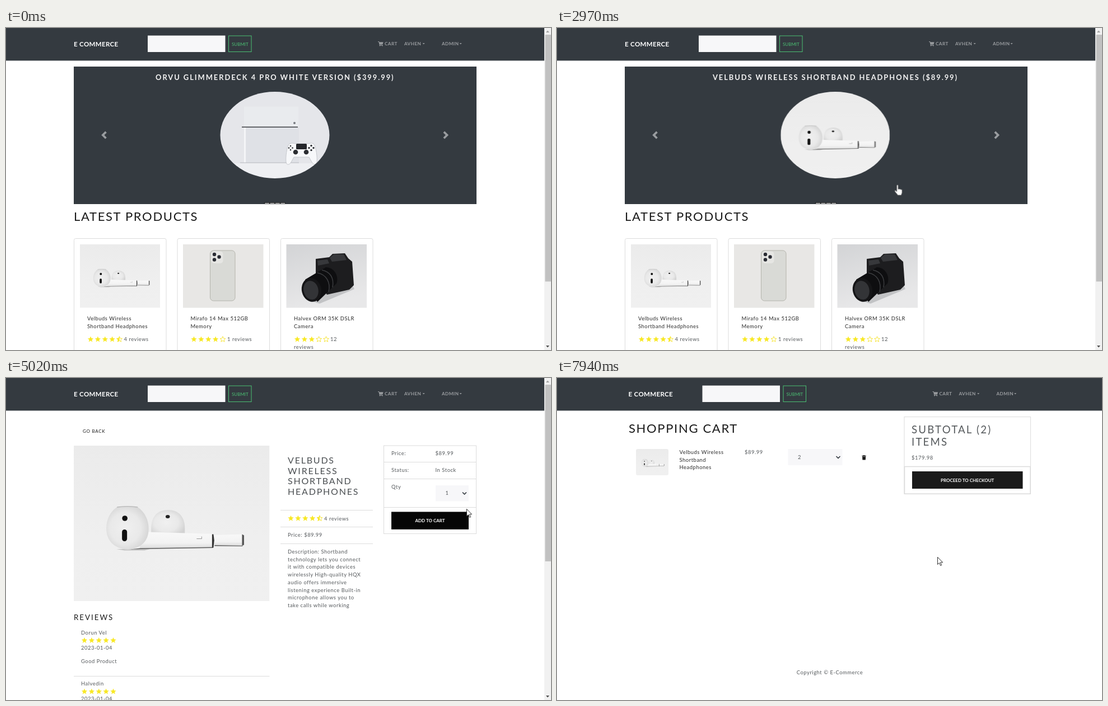
These frames come from a looping animation (973 by 576 pixels, 8 s). An HTML page:

```html
<!DOCTYPE html>
<html lang="en">
<head>
<meta charset="utf-8">
<title>Shop walkthrough</title>
<style>
html, body { margin: 0; width: 100%; height: 100%; overflow: hidden; background: #fff; }
svg { display: block; font-family: Lato, "Open Sans", sans-serif; }
text { white-space: pre; }

/* type */
.t { font-size: 9.4px; letter-spacing: .55px; fill: #55595c; }
.k { fill: #2a2a2a; }
.h1 { font-size: 22px; letter-spacing: 1.67px; fill: #1a1a1a; }
.h2 { font-size: 18.6px; letter-spacing: 2.2px; fill: #55595c; }
.h3 { font-size: 16px; letter-spacing: 1.8px; fill: #4b4f52; }
.h4 { font-size: 13.3px; letter-spacing: 2px; fill: #1a1a1a; }
.cap { font-size: 12.9px; font-weight: 700; letter-spacing: 1.95px; fill: #f4f4f4; text-anchor: middle; }
.brand { font-size: 11.5px; font-weight: 700; letter-spacing: .35px; fill: #fff; }
.nav { font-size: 8.2px; font-weight: 700; letter-spacing: .4px; }
.btn { font-size: 8px; font-weight: 700; fill: #fff; text-anchor: middle; }
.back { font-size: 8px; letter-spacing: .7px; fill: #1a1a1a; }
.url { font: 9.6px "Open Sans", "Noto Sans", sans-serif; fill: #3c4043; }
.line { fill: none; stroke: #dcdcdc; }
.chev { fill: none; stroke: #343a40; stroke-width: 1.7; stroke-linecap: round; stroke-linejoin: round; }
.star { fill: #f8e825; stroke: #f8e825; stroke-width: .2; stroke-linejoin: round; }
.hollow { fill: none; stroke: #f5e11c; stroke-width: .9; stroke-linejoin: round; }

/* hard switches */
.head, .home, .load, .item, .cart, .old, .status, .popup, .one, .two,
.opt1, .opt2, .empty, .full, .arrow, .hand { animation: 8s step-end infinite; }
.head { animation-name: head; }
.home { animation-name: home; }
.load { animation-name: load; }
.item { animation-name: item; }
.cart { animation-name: cart; }
.old { animation-name: old; }
.status { animation-name: status; }
.popup { animation-name: popup; }
.one { animation-name: one; }
.two { animation-name: two; }
.opt1 { animation-name: opt1; }
.opt2 { animation-name: opt2; }
.empty { animation-name: empty; }
.full { animation-name: full; }
.arrow { animation-name: arrow; }
.hand { animation-name: hand; }
@keyframes head {
  0%, 54.125% { transform: none; }
  49.75%, 91.75%, to { transform: translateX(6.5px); }
}
@keyframes home { 0% { opacity: 1; } 49.75%, to { opacity: 0; } }
@keyframes load { 0%, 54.125%, to { opacity: 0; } 49.75% { opacity: 1; } }
@keyframes item { 0%, 91.75%, to { opacity: 0; } 54.125% { opacity: 1; } }
@keyframes cart { 0% { opacity: 0; } 91.75%, to { opacity: 1; } }
@keyframes old { 0% { opacity: 1; } 31%, to { opacity: 0; } }
@keyframes status { 0%, 54.125%, to { opacity: 0; } 42.25% { opacity: 1; } }
@keyframes popup { 0%, 80.5%, to { opacity: 0; } 67.75% { opacity: 1; } }
@keyframes one { 0% { opacity: 1; } 80.5%, to { opacity: 0; } }
@keyframes two { 0% { opacity: 0; } 80.5%, to { opacity: 1; } }
@keyframes opt1 { 0% { opacity: 1; } 73.75%, to { opacity: 0; } }
@keyframes opt2 { 0% { opacity: 0; } 73.75%, to { opacity: 1; } }
@keyframes empty { 0% { opacity: 1; } 96.125%, to { opacity: 0; } }
@keyframes full { 0% { opacity: 0; } 96.125%, to { opacity: 1; } }
@keyframes arrow {
  0%, 35.5%, 60%, 83%, 88.1% { opacity: 0; }
  1.625%, 49.75%, 62.3%, 85.75%, 91.75%, to { opacity: 1; }
}
@keyframes hand {
  0%, 49.75%, 62.3%, 85.75%, 91.75%, to { opacity: 0; }
  35.5%, 60%, 83%, 88.1% { opacity: 1; }
}

/* motion */
.new { animation: slide 8s infinite; }
@keyframes slide {
  0%, 30.45% { transform: translateX(719px); animation-timing-function: ease-in-out; }
  37.95%, to { transform: none; }
}
.spin { transform-origin: 487px 153px; animation: spin 8s linear infinite; }
@keyframes spin { from { transform: rotate(265.6deg); } to { transform: rotate(4105.6deg); } }
.focus { animation: focus 8s linear infinite; }
@keyframes focus { 0%, 67.75% { opacity: 0; } 70%, to { opacity: 1; } }
.add { animation: add 8s linear infinite; }
@keyframes add {
  0%, 60%, 64.25%, 83%, 86.7%, 88.1% { fill: #1a1a1a; }
  61%, 62.3%, 84.25%, 85.75%, 89.5%, to { fill: #000; }
}
.mouse { animation: mouse 8s linear infinite; }
@keyframes mouse {
  0%, 1.625% { transform: translate(870px, 530px); }
  3.25%, 7.375% { transform: translate(714px, 420px); }
  8.25%, 12.625% { transform: translate(723px, 417px); }
  15.125%, 21.75% { transform: translate(738px, 401px); }
  22.625%, 31% { transform: translate(757px, 402px); }
  37.125% { transform: translate(608px, 282px); }
  40.5%, 41.375% { transform: translate(489px, 174px); }
  47.375%, 54.125% { transform: translate(491px, 182px); }
  59.25% { transform: translate(760px, 300px); }
  61% { transform: translate(790px, 262px); }
  62.75% { transform: translate(822px, 234px); }
  64.5%, 70.375% { transform: translate(808px, 208px); }
  76.375%, 80.5% { transform: translate(795px, 240px); }
  86.625%, 87.5% { transform: translate(751px, 282px); }
  90.125%, 96.125% { transform: translate(734px, 256px); }
  99.25%, to { transform: translate(679px, 320px); }
}
</style>
</head>
<body>
<svg width="973" height="576" viewBox="0 0 973 576">
<defs>
  <linearGradient id="wall" x2="0" y2="1">
    <stop offset="0" stop-color="#ebebeb"/><stop offset=".6" stop-color="#efefef"/><stop offset="1" stop-color="#f0f0f0"/>
  </linearGradient>
  <linearGradient id="stem" x2="0" y2="1">
    <stop offset="0" stop-color="#f8f8f8"/><stop offset=".65" stop-color="#f3f3f3"/><stop offset="1" stop-color="#dadada"/>
  </linearGradient>
  <radialGradient id="shell" cx=".45" cy=".5" r=".6">
    <stop offset="0" stop-color="#f0f0f0"/><stop offset=".6" stop-color="#e9e9e9"/><stop offset="1" stop-color="#d2d2d2"/>
  </radialGradient>
  <linearGradient id="grey" x2=".3" y2="1">
    <stop offset="0" stop-color="#d3d4d6"/><stop offset="1" stop-color="#e8e8e9"/>
  </linearGradient>
  <clipPath id="stage"><rect x="121" y="69" width="718.5" height="245.5"/></clipPath>
  <clipPath id="oval"><ellipse cx="480" cy="191.5" rx="97.5" ry="77.5"/></clipPath>
  <clipPath id="thumb"><rect x="141" y="127" width="58" height="47" rx="3"/></clipPath>

  <symbol id="buds" viewBox="0 0 349 278" preserveAspectRatio="none">
    <path fill="url(#wall)" d="M0 0h349v278H0z"/>
    <path fill="#c4c4c4" d="M76 185h60l-10 2.500H90z"/>
    <path fill="url(#shell)" d="M138 148c0-22 12-33 30-33s30 11 30 33v12h-60z"/>
    <path fill="url(#stem)" d="M118 154l131 4v24l-131 2.500z"/>
    <path fill="#5c5c5c" d="M100 185.500l18-2 130-2v1.500l-128 2z"/>
    <path fill="#333" d="M246.500 158.500h2.500l1.500 11-1.500 13h-2.500z"/>
    <path fill="url(#stem)" d="M250.500 160l50-1.500v20.500l-50-1z"/>
    <path fill="#555" d="M251 178l50 1v1l-50-.5zM300 158.500l3.500 2v17l-3.500 1.500z"/>
    <path fill="none" stroke="#999" d="M219 166.500h9v-4"/>
    <path fill="url(#shell)" d="M77 110c12-1.500 26-1.500 37 0 13 9 19.500 23 19.500 39 0 20-12 35-37.500 37-25-2-38-17-38-38 0-16 7-30 19-38z"/>
    <path fill="none" stroke="#a8a8a8" d="M77 110c12-1.500 26-1.500 37 0"/>
    <circle cx="91" cy="130" r="4.800" fill="#111"/>
    <rect x="86" y="150" width="9" height="21" rx="4.500" fill="#111"/>
    <ellipse cx="167.500" cy="127" rx="3.800" ry="3" fill="#222"/>
  </symbol>

  <path id="s" transform="scale(.94)" d="M0-5.6 1.5-2 5.3-1.7 2.4.8 3.3 4.5 0 2.5-3.3 4.5-2.4.8-5.3-1.7-1.5-2z"/>
  <use id="on" href="#s" class="star"/>
  <use id="off" href="#s" class="hollow"/>
  <g id="half"><use href="#off"/><path class="star" transform="scale(.94)" d="M0-5.6V2.5L-3.3 4.5-2.4.8-5.3-1.7-1.5-2z"/></g>
  <g id="three"><use href="#on"/><use href="#on" x="12.9"/><use href="#on" x="25.8"/></g>
  <g id="four"><use href="#three"/><use href="#on" x="38.6"/></g>
  <g id="rate45"><use href="#four"/><use href="#half" x="51.5"/></g>
  <g id="rate5"><use href="#four"/><use href="#on" x="51.5"/></g>

  <rect id="card" class="line" x=".5" y="376.5" width="164.5" height="230" rx="3"/>
  <g id="bar">
    <path fill="#f1f1f1" d="M961 0h12v576h-12z"/>
    <path fill="#a3a3a3" d="M964 8l3-3.500 3 3.500z"/>
    <path fill="#505050" d="M964 568l3 3.500 3-3.500z"/>
  </g>
  <path id="down" class="chev" d="M-3-1.500 0 1.500 3-1.500"/>
  <path id="caret" d="M0 0h4l-2 2.300z"/>
  <text id="copy" class="t" x="487" y="530" text-anchor="middle">Copyright © E-Commerce</text>
</defs>

<rect width="973" height="576" fill="#fff"/>
<rect width="973" height="58.4" fill="#343a40"/>

<g class="head">
  <text class="brand" x="121" y="32.5">E COMMERCE</text>
  <rect x="253" y="13.5" width="138.5" height="29.5" fill="#f7f7f9"/>
  <rect x="397.5" y="14" width="40.5" height="28.5" fill="none" stroke="#4bbf73"/>
  <text x="403" y="31.5" font-size="8" fill="#4bbf73">SUBMIT</text>
  <g fill="#999c9f">
    <path d="M664 24h2.200l.3 1.200h7l-1 4h-5l.2.900h4.500v.9h-5.300L665.500 25H664z"/>
    <circle cx="667.6" cy="31.5" r="1"/><circle cx="671.7" cy="31.5" r="1"/>
    <g class="nav">
      <text x="676" y="31">CART</text>
      <text x="711" y="31">AVHEN</text>
      <text x="778" y="31">ADMIN</text>
    </g>
    <use href="#caret" x="743.7" y="27"/><use href="#caret" x="809.7" y="27"/>
  </g>
</g>

<g class="home">
  <g clip-path="url(#stage)">
    <rect x="121" y="69" width="719" height="246" fill="#343a40"/>
    <g class="old">
      <text class="cap" x="480.3" y="93">ORVU GLIMMERDECK 4 PRO WHITE VERSION ($399.99)</text>
      <g clip-path="url(#oval)">
        <path fill="#e5e6ea" d="M380 110h200v162H380z"/>
        <path fill="#eeeff2" d="M380 242h200v30H380z"/>
        <path fill="#e9ebee" d="M425 140.500h97V177h-97z"/>
        <path fill="#dfe1e6" d="M425 178h98v63h-98z"/>
        <path fill="#f4f5f7" d="M425 178h3v63h-3z"/>
        <path fill="#3a3c40" d="M421 176.600h100v1.300H421z"/>
        <path fill="#b9bcc2" d="M418 240.500h105v1H418z"/>
        <circle cx="515" cy="170" r="2" fill="#777a80"/>
        <path fill="#f7f8fa" stroke="#b5b8be" stroke-width=".7" d="M506 207c5-2 9 0 12 0h19c3 0 8-2 12 0 5 5 7 26 6 33-1 6-6 5-9 0l-5-9h-27l-5 9c-3 5-8 6-9 0-1-8 1-28 6-33z"/>
        <rect x="518" y="207" width="19" height="10" rx="1.5" fill="#24262a"/>
        <g fill="#2b2d31">
          <circle cx="517" cy="222" r="4.3"/><circle cx="536" cy="222" r="4.3"/>
          <circle cx="508" cy="211" r="1.3"/><circle cx="508" cy="218" r="1.3"/>
          <circle cx="505" cy="214.5" r="1.3"/><circle cx="511.5" cy="214.5" r="1.3"/>
          <circle cx="545" cy="210.5" r="1.7"/><circle cx="545" cy="218.5" r="1.7"/>
          <circle cx="541" cy="214.5" r="1.7"/><circle cx="549" cy="214.5" r="1.7"/>
        </g>
      </g>
    </g>
    <g class="new">
      <text class="cap" x="480.3" y="93">VELBUDS WIRELESS SHORTBAND HEADPHONES ($89.99)</text>
      <g clip-path="url(#oval)"><use href="#buds" x="382.5" y="114" width="195" height="155"/></g>
    </g>
    <g fill="#999c9f">
      <path transform="translate(168 184.5) scale(1.75)" d="M5.250 0l-4 4 4 4 1.500-1.500L4.250 4l2.500-2.500z"/>
      <path transform="translate(778.3 184.5) scale(1.75)" d="M2.750 0l-1.500 1.500L3.750 4l-2.500 2.500L2.750 8l4-4z"/>
    </g>
    <path fill="#111" d="M461 312h38v3h-38z"/>
    <path stroke="#fff" stroke-width="1.2" stroke-dasharray="8 1.4" d="M462 313.600h36.500"/>
  </g>

  <text class="h1" x="121" y="344.5">LATEST PRODUCTS</text>
  <use href="#card" x="121"/><use href="#card" x="305.5"/><use href="#card" x="490"/>

  <use href="#buds" x="132" y="387" width="143" height="113.5"/>
  <path fill="#e8e7e5" d="M316 387h143.500v113.500H316z"/>
  <rect x="364.5" y="398" width="44.5" height="90" rx="6" fill="#d9dad6" stroke="#b4b4ac"/>
  <rect x="366.5" y="399.5" width="21" height="21.5" rx="5" fill="#e6e6e3"/>
  <g fill="#2a2c33"><circle cx="372" cy="405" r="3.2"/><circle cx="372" cy="414.5" r="3.2"/><circle cx="380.5" cy="409.5" r="3.2"/></g>
  <path fill="url(#grey)" d="M500.500 387H644v113.500H500.500z"/>
  <path fill="#c2c3c5" d="M535 486l25 7 62-26-4-8z"/>
  <path fill="#1d1d1f" d="M553 413l24-3 6-6 22-1 6 9 7 6 3 42-8 8-40 9-20-28z"/>
  <path fill="#37383b" d="M578 411l7-6h18l5 10-26 3zM556 416l18-2 3 7-20 4z"/>
  <path fill="#0e0e10" d="M534 450l37-22c14 0 24 15 19 29l-34 33z"/>
  <path fill="none" stroke="#3b3c3f" stroke-width="1.5" d="M556 438c16 3 24 17 20 34M564 433c15 3 22 14 19 31"/>
  <ellipse cx="545.5" cy="468.5" rx="17.5" ry="21.5" transform="rotate(-14 545.5 468.5)" fill="#151517"/>
  <ellipse cx="544.5" cy="469" rx="13" ry="17" transform="rotate(-14 544.5 469)" fill="#333437"/>

  <g class="t">
    <g class="k">
      <text x="145" y="523">Velbuds Wireless<tspan x="145" dy="13.7">Shortband Headphones</tspan></text>
      <text x="329.5" y="523">Mirafo 14 Max 512GB<tspan x="329.5" dy="13.7">Memory</tspan></text>
      <text x="514" y="523">Halvex ORM 35K DSLR<tspan x="514" dy="13.7">Camera</tspan></text>
    </g>
    <text x="210.5" y="560">4 reviews</text>
    <text x="395" y="560">1 reviews</text>
    <text x="579" y="560">12<tspan x="514" dy="13.7">reviews</tspan></text>
  </g>
  <use href="#rate45" x="151" y="557"/>
  <use href="#four" x="335.5" y="557"/><use href="#off" x="387" y="557"/>
  <use href="#three" x="520" y="557"/><use href="#off" x="558.6" y="557"/><use href="#off" x="571.5" y="557"/>

  <use href="#bar"/><path fill="#c1c1c1" d="M962.500 12H973v441.500h-10.500z"/>
</g>

<g class="load">
  <text class="back" x="143.5" y="98">GO BACK</text>
  <circle class="spin" cx="487" cy="153" r="31.5" fill="none" stroke="#66696c" stroke-width="2" pathLength="360" stroke-dasharray="270 90" stroke-dashoffset="-45"/>
  <use href="#copy"/>
</g>

<g class="item">
  <text class="back" x="137" y="98">GO BACK</text>
  <use href="#buds" x="121" y="121" width="349.5" height="278"/>
  <text class="h3" x="503" y="153">VELBUDS<tspan x="503" dy="18.6">WIRELESS</tspan><tspan x="503" dy="18.6">SHORTBAND</tspan><tspan x="503" dy="18.6">HEADPHONES</tspan></text>
  <path class="line" d="M490 236.500h165M490 266.500h165M490 296.500h165M121 533.500h349.500M675 150.500h164.500M675 180.500h164.500M675 231.500h164.500"/>
  <rect class="line" x="674.5" y="121" width="165" height="157.5"/>
  <use href="#rate45" x="508.5" y="251.2"/>
  <g class="t">
    <text x="568" y="254.5">4 reviews</text>
    <text x="503" y="284">Price: $89.99</text>
    <text x="503" y="314">Description: Shortband<tspan x="503" dy="13.7">technology lets you connect</tspan><tspan x="503" dy="13.7">it with compatible devices</tspan><tspan x="503" dy="13.7">wirelessly High-quality HQX</tspan><tspan x="503" dy="13.7">audio offers immersive</tspan><tspan x="503" dy="13.7">listening experience Built-in</tspan><tspan x="503" dy="13.7">microphone allows you to</tspan><tspan x="503" dy="13.7">take calls while working</tspan></text>
    <text x="688" y="138">Price:</text><text x="766.5" y="138">$89.99</text>
    <text x="688" y="168">Status:</text><text x="766.5" y="168">In Stock</text>
    <text x="688" y="198">Qty</text>
    <text x="134" y="459">Dorun Vel</text>
    <text x="134" y="486">2023-01-04</text>
    <text x="134" y="510">Good Product</text>
    <text x="134" y="550">Halvedin</text>
    <text x="134" y="577">2023-01-04</text>
  </g>
  <text class="h4" x="121" y="433">REVIEWS</text>
  <use href="#rate5" x="140" y="469.5"/><use href="#rate5" x="140" y="561"/>

  <rect x="767" y="192" width="59" height="28.5" fill="#f7f7f9"/>
  <rect class="focus" x="766" y="191" width="61" height="30.5" fill="none" stroke="#bfbfc1" stroke-width="2"/>
  <text class="t one" x="784.5" y="209">1</text>
  <text class="t two" x="784.5" y="209">2</text>
  <use href="#down" x="818.5" y="206.5"/>
  <rect class="add" x="688" y="239.4" width="138" height="31.4"/>
  <text class="btn" x="757" y="258">ADD TO CART</text>

  <g class="popup">
    <rect x="765.5" y="223" width="63" height="172" fill="#f7f7f9" stroke="#8a8a8a" stroke-width=".8"/>
    <text class="t" x="784.5" y="235">1<tspan x="784.5" dy="17.2">2</tspan><tspan x="784.5" dy="17.2">3</tspan><tspan x="784.5" dy="17.2">4</tspan><tspan x="784.5" dy="17.2">5</tspan><tspan x="784.5" dy="17.2">6</tspan><tspan x="784.5" dy="17.2">7</tspan><tspan x="784.5" dy="17.2">8</tspan><tspan x="784.5" dy="17.2">9</tspan><tspan x="784.5" dy="17.2">10</tspan></text>
    <g class="opt1"><path fill="#1967d2" d="M766 223.500h62v16.500h-62z"/><text class="t" x="784.5" y="235" style="fill:#fff">1</text></g>
    <g class="opt2"><path fill="#1967d2" d="M766 240.500h62V257h-62z"/><text class="t" x="784.5" y="252.2" style="fill:#fff">2</text></g>
  </g>
  <use href="#bar"/><path fill="#c1c1c1" d="M962.500 12H973v316h-10.500z"/>
</g>

<g class="cart">
  <text class="h1" x="128" y="98">SHOPPING CART</text>
  <rect class="line" x="620" y="69.5" width="225.5" height="138"/>
  <rect class="line" x="620.5" y="158.5" width="224.5" height="48.7" stroke-width="1.5"/>
  <text class="h2" x="633" y="121">ITEMS</text>
  <g class="empty">
    <text class="h2" x="633" y="99">SUBTOTAL (0)</text>
    <text class="t" x="633" y="145.5">$0.00</text>
    <rect x="634" y="167" width="197.5" height="31" fill="#6a6a6a"/>
  </g>
  <g class="full">
    <text class="h2" x="633" y="99">SUBTOTAL (2)</text>
    <text class="t" x="633" y="145.5">$179.98</text>
    <rect x="634" y="167" width="197.5" height="31" fill="#1a1a1a"/>
    <g clip-path="url(#thumb)"><use href="#buds" x="141" y="127" width="58" height="47"/></g>
    <text class="t k" x="218.5" y="136">Velbuds Wireless<tspan x="218.5" dy="13.7">Shortband</tspan><tspan x="218.5" dy="13.7">Headphones</tspan></text>
    <text class="t" x="335" y="136">$89.99</text>
    <rect x="412.5" y="127" width="97" height="29" fill="#f7f7f9"/>
    <text class="t" x="430" y="145">2</text>
    <use href="#down" x="502" y="142"/>
    <path fill="#1a1a1a" d="M544.500 138.800h2.200l.6-.800h1.600l.6.800h2.200v1.100h-7.200zM545 140.500h6.200l-.4 6h-5.400z"/>
  </g>
  <text class="btn" x="732.7" y="185.5">PROCEED TO CHECKOUT</text>
  <use href="#copy"/>
</g>

<g class="status">
  <path fill="#dee1e6" d="M0 559h124q3 0 3 3v14H0z"/>
  <text class="url" x="3" y="571.5">storehost:4100/#/article/1</text>
</g>

<g class="mouse" fill="#fff" stroke="#1a1a1a">
  <path class="arrow" stroke-width=".9" d="M.5.500v13l3-2.800 2.200 4.900 2-.9-2.200-4.800h4.200z"/>
  <path class="hand" stroke-width=".5" d="M-1 .500c0-2 2.600-2 2.600 0V7l.3-.100c.4-1.300 2.300-1 2.400.2.600-1 2.200-.6 2.300.5.600-.7 2-.3 2 .8v4.200c0 2-1.400 2.800-1.400 4.900H.6c-.3-2-4.400-5.200-5.100-7.100-.6-1.600 1.200-2.200 2.200-1L-1 11z"/>
</g>
</svg>
</body>
</html>
```
